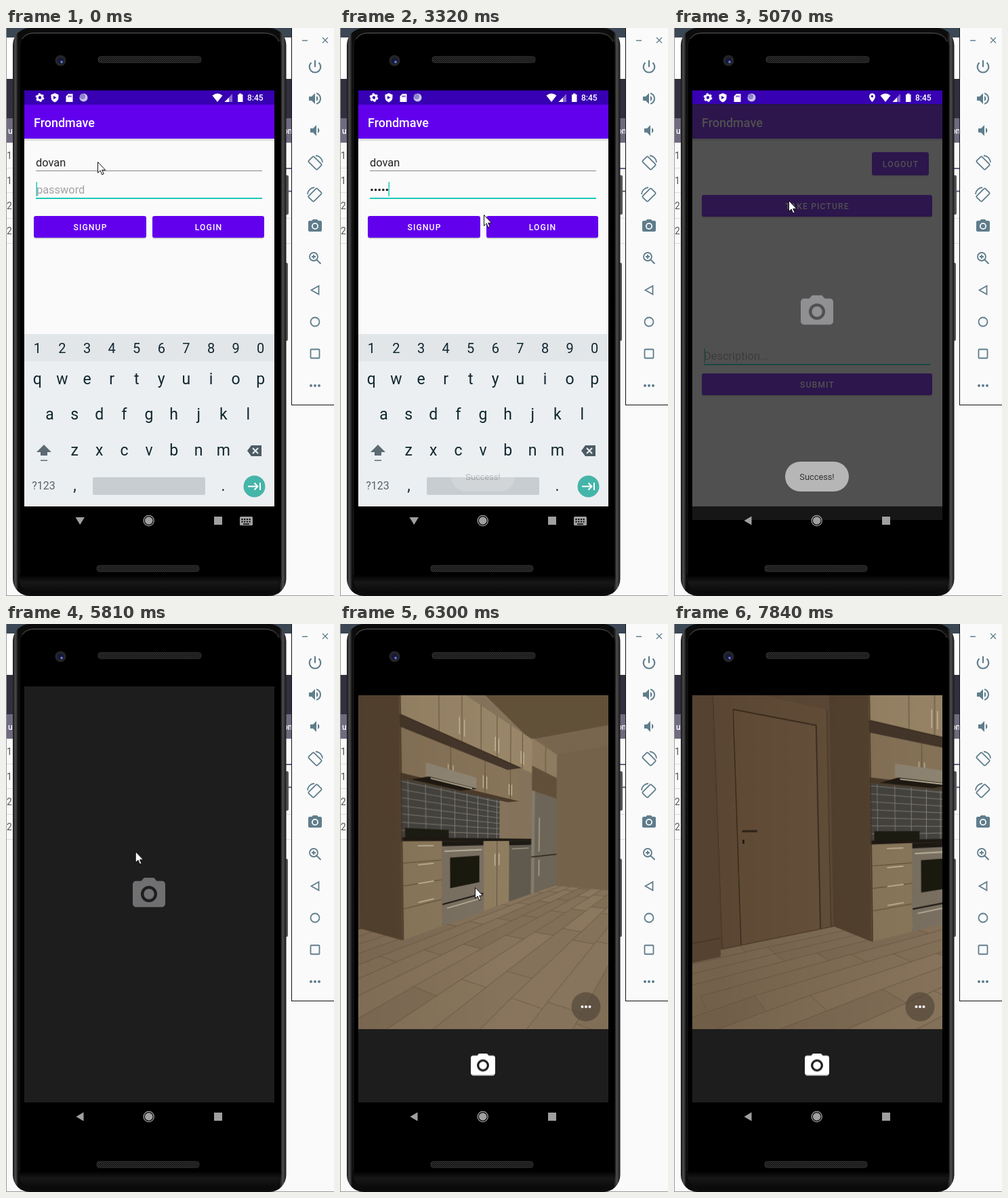
An HTML page with a canvas for the animation above (7.99 s loop, 484 by 837 pixels).

```html
<!DOCTYPE html>
<html lang="en">
<head>
<meta charset="utf-8">
<title>Phone emulator</title>
<style>
html, body { margin: 0; width: 100%; height: 100%; overflow: hidden; background: #fafafa; }
#stage { position: absolute; left: 0; top: 0; width: 484px; height: 837px; overflow: hidden; }
svg { position: absolute; left: 0; top: 0; font-family: Roboto, "Noto Sans", sans-serif; }
#view { position: absolute; left: 27px; top: 92px; width: 369px; height: 505px; background: #000; }
#lens { position: absolute; left: 0; top: 13px; width: 369px; height: 492px; overflow: hidden; }
#room { position: absolute; left: -327px; top: -125px; width: 760px; height: 740px; transform-origin: 511px 371px; }
.btn { font-size: 12.2px; font-weight: 500; letter-spacing: 1.1px; fill: #fff; text-anchor: middle; }
.key { font-size: 23px; fill: #10272f; text-anchor: middle; }
.field { font-size: 16.4px; fill: #222; }
.hint { fill: #a3a3a3; }
.tool { fill: #5f7d8c; }
.line { fill: none; stroke: #5f7d8c; stroke-width: 1.8; }
</style>
</head>
<body>
<div id="stage">
<svg width="484" height="837" viewBox="0 0 484 837">
  <defs>
    <clipPath id="screen"><rect x="27" y="92" width="369" height="613"/></clipPath>
    <clipPath id="loginBox"><rect x="216" y="277" width="165" height="32" rx="3"/></clipPath>
    <clipPath id="takeBox"><rect x="41" y="246" width="340" height="32" rx="3"/></clipPath>
    <linearGradient id="chin" x1="0" y1="0" x2="0" y2="1"><stop offset="0"/><stop offset=".4" stop-color="#171717"/><stop offset="1" stop-color="#080808"/></linearGradient>
    <linearGradient id="rim"><stop offset="0" stop-color="#161616"/><stop offset=".01" stop-color="#4c4c4c"/><stop offset=".02" stop-color="#0c0c0c"/><stop offset=".975" stop-color="#0c0c0c"/><stop offset=".988" stop-color="#4c4c4c"/><stop offset="1" stop-color="#161616"/></linearGradient>
    <pattern id="mesh" width="3" height="3" patternUnits="userSpaceOnUse"><rect width="3" height="3" fill="#111"/><path d="M0 0l3 3M3 0l-3 3" stroke="#383838" stroke-width=".7"/></pattern>
    <g id="shutter" transform="translate(-12 -11)"><path fill-rule="evenodd" d="M9 2L7.2 4H4a2 2 0 0 0-2 2v12a2 2 0 0 0 2 2h16a2 2 0 0 0 2-2V6a2 2 0 0 0-2-2h-3.2L15 2zM12 17a5 5 0 1 1 0-10 5 5 0 0 1 0 10z"/><circle cx="12" cy="12" r="3.2"/></g>
  </defs>

  <!-- desktop behind the phone -->
  <rect width="484" height="837" fill="#fafafa"/>
  <rect width="421" height="14" fill="#3b4754"/>
  <rect y="14" width="421" height="61" fill="#fff"/>
  <rect y="75" width="421" height="58" fill="#322f3e"/>
  <rect y="133" width="421" height="36" fill="#706a80"/>
  <path d="M0 206.5H421M0 242.5H421M0 280.5H421M0 317.5H421" stroke="#ddd"/>
  <path d="M412 207h9M412 240.5h9" stroke="#3b3560" stroke-width="1.5"/>
  <g font-size="12" fill="#fff" font-weight="500"><text x="3" y="156">u</text><text x="409" y="156">om</text></g>
  <g font-size="14" fill="#555"><text x="1" y="193">1</text><text x="1" y="230">1</text><text x="1" y="267">2</text><text x="1" y="304">2</text></g>
  <path d="M0 836.5H484M.5 0V837" stroke="#999"/>

  <!-- phone body -->
  <rect x="411" y="217" width="6" height="58" rx="2" fill="#555"/>
  <rect x="411" y="346" width="5" height="115" rx="2" fill="#555"/>
  <rect x="10" y="0" width="403.500" height="837" rx="25" fill="url(#rim)"/>
  <rect x="20" y="7" width="386" height="824" rx="20" stroke="#1c1c1c"/>
  <path d="M24 16Q29 7.500 42 7.500H380Q398 7.500 403 20" fill="none" stroke="#555"/>
  <path d="M19 806H406Q404 833 382 833H42Q22 833 19 806" fill="url(#chin)"/>
  <rect x="136" y="42" width="152" height="9" rx="4" fill="url(#mesh)" stroke="#333"/>
  <rect x="134" y="792" width="151" height="9" rx="4" fill="url(#mesh)" stroke="#333"/>
  <circle cx="80.500" cy="48" r="8" fill="#252528"/><circle cx="80.500" cy="48" r="4.500" fill="#151a38"/><circle cx="82" cy="50" r="1.800" fill="#6b7ff0"/>

  <g clip-path="url(#screen)">
    <rect x="27" y="92" width="369" height="613" fill="#fafafa"/>
    <g id="login">
      <text class="field" x="44" y="204">dovan</text>
      <path d="M44 210.500H378" stroke="#888"/>
      <text id="hint" class="field hint" x="45" y="244">password</text>
      <g id="dots"></g>
      <text id="letter" class="field" x="44" y="244">e</text>
      <path d="M44 251H378" stroke="#1ec9b7" stroke-width="1.800"/>
      <rect id="caret" x="44.500" y="227" width="1.500" height="21" fill="#1ec9b7"/>
      <g id="entry"></g>
      <g clip-path="url(#loginBox)"><circle id="rippleA" cx="287" cy="293" r="1" fill="#fff"/></g>
      <g id="kb"></g>
    </g>
    <g id="main">
      <rect x="27" y="163" width="369" height="542" fill="#fefefe"/>
      <g id="post"></g>
      <g clip-path="url(#takeBox)"><circle id="rippleB" cx="169" cy="255" r="1" fill="#fff"/></g>
      <text class="field hint" x="44" y="489">Description...</text>
      <path d="M44 496H378" stroke="#1ed8d0" stroke-width="1.800"/>
      <rect x="44.500" y="472" width="1.300" height="22" fill="#1ec9b7"/>
    </g>
    <rect x="27" y="163" width="369" height="3" opacity=".12"/>
    <rect x="27" y="113" width="369" height="50" fill="#6200ee"/>
    <text x="41" y="145.500" font-size="18" font-weight="500" fill="#fff">Frondmave</text>
    <rect x="27" y="92" width="369" height="21" fill="#3700b3"/>
    <g fill="#fff">
      <circle cx="50" cy="102.500" r="3.700" fill="none" stroke="#fff" stroke-width="3"/>
      <circle cx="50" cy="102.500" r="5.400" fill="none" stroke="#fff" stroke-width="2" stroke-dasharray="2.800 2.850"/>
      <path fill-rule="evenodd" d="M72 96l5.500 2.300v4q0 5-5.500 7.200-5.500-2.200-5.500-7.200v-4zM70 100v5l4.500-2.500z"/>
      <path fill-rule="evenodd" d="M92 97h6.500v12h-10v-8.500zM91.500 99.500v2.500h1v-2.500zM93.500 99.500v2.500h1v-2.500zM95.500 99.500v2.500h1v-2.500z"/>
      <circle cx="114.500" cy="102.500" r="6" fill="#c9c4ea"/><circle cx="113" cy="101" r="4" fill="#8f82cf"/>
      <path id="pin" fill-rule="evenodd" d="M292.500 109q-4.500-5-4.500-8.200a4.500 4.500 0 0 1 9 0q0 3.200-4.500 8.200zM292.500 99a1.700 1.700 0 1 0 .01 0z"/>
      <path d="M304.500 99.500q7.500-6 15 0L312 109z"/>
      <path d="M334 97v12H322.500z" opacity=".4"/><path d="M329 102.500V109h-6.500z"/>
      <path d="M342 98h2v-1.500h3.500V98h2v11H342z"/>
      <text x="356" y="107" font-size="12" font-weight="500">8:45</text>
    </g>
  </g>

  <g id="cam">
    <rect x="27" y="92" width="369" height="613" fill="#1d1d1d"/>
    <use id="bigShot" href="#shutter" fill="#707073" transform="translate(211 395.500) scale(2.400)"/>
    <use id="smallShot" href="#shutter" fill="#fff" transform="translate(211 648.700) scale(1.800)"/>
  </g>

  <g fill="#a0a0a0">
    <g id="navKb"><path d="M102.500 721h13.500l-6.750 11z"/><rect x="345" y="720" width="19" height="13" rx="1.500"/><path d="M347.500 724H362M347.500 727.500H362" stroke="#000" stroke-width="2" stroke-dasharray="2 1.700"/><path d="M350 731h9" stroke="#000" stroke-width="1.500"/></g>
    <path id="navBack" d="M114.500 719.500v13l-11-6.500z"/>
    <circle cx="210.700" cy="726" r="5.800"/><circle cx="210.700" cy="726" r="7.600" fill="none" stroke="#a0a0a0" stroke-width="1.300"/>
    <rect x="307" y="720" width="12" height="12"/>
  </g>
  <g id="toast"><rect x="164" y="639" width="94" height="44" rx="22" fill="#efefef"/><text x="211" y="666" font-size="12.800" fill="#222" text-anchor="middle">Success!</text></g>

  <!-- emulator toolbar -->
  <rect x="421.500" y="-2" width="70" height="557.500" fill="#fafafa" stroke="#111"/>
  <path class="line" style="stroke-width:1.300" d="M437 18.500h8M467 14l8 8M475 14l-8 8"/>
  <path class="line" d="M456 47.500v10M450.500 51a8.300 8.300 0 1 0 11 0" style="stroke-width:2.200"/>
  <path class="tool" transform="translate(444 92)" d="M3 9v6h4l5 5V4L7 9zM16.500 12q0-2.700-2.500-4v8q2.500-1.300 2.500-4zM14 3.200v2.100q5 1.700 5 6.700t-5 6.700v2.100q7-2 7-8.800t-7-8.800z"/>
  <path class="tool" transform="translate(444 139)" d="M18.500 12q0-2.700-2.500-4v8q2.500-1.300 2.500-4zM5 9v6h4l5 5V4L9 9z"/>
  <g id="turn"><rect class="line" x="-5.500" y="-9" width="11" height="18" rx="1.500" transform="translate(456 199) rotate(-45)"/><path class="line" d="M457 188a10.500 10.500 0 0 1 10 10"/></g>
  <use href="#turn" transform="translate(912 47) scale(-1 1)"/>
  <use href="#shutter" class="tool" transform="translate(456 291)"/>
  <path class="line" d="M460 337a6 6 0 1 0-12 0 6 6 0 0 0 12 0zM458.500 341.500l6 6M451 337h6M454 334v6"/>
  <path class="line" d="M461.500 380v12.500l-11-6.250z"/>
  <circle class="line" cx="456" cy="433" r="6.500"/>
  <rect class="line" x="449.500" y="473.500" width="13" height="13" rx="1"/>
  <path d="M450 527h12.100" fill="none" stroke="#5f7d8c" stroke-width="4" stroke-linecap="round" stroke-dasharray="0 6"/>
</svg>

<div id="view"><div id="lens"><canvas id="room" width="1520" height="1480"></canvas></div></div>

<svg width="484" height="837" viewBox="0 0 484 837">
  <g id="more"><circle cx="363" cy="564" r="21.500" fill="#4b4034" opacity=".6"/><path d="M357.500 564h11.100" stroke="#fff" stroke-width="4" stroke-linecap="round" stroke-dasharray="0 5.500"/></g>
  <path id="mouse" d="M.5.500V16.500l3.700-3.500 2.500 6 2.500-1-2.500-5.700h5z" fill="#fff" stroke="#111"/>
</svg>
</div>

<script>
const $ = id => document.getElementById(id);
const LOOP = 7990, TICK = 120;

// ---- static interface parts ----
const button = (x, y, w, h, label) =>
  `<rect x="${x}" y="${y + 1.5}" width="${w}" height="${h}" rx="3" opacity=".22"/>
   <rect x="${x}" y="${y}" width="${w}" height="${h}" rx="3" fill="#6200ee"/>
   <text class="btn" x="${x + w / 2 + .5}" y="${y + h / 2 + 4.5}">${label}</text>`;
$('entry').innerHTML = button(41, 277, 166, 32, 'SIGNUP') + button(216, 277, 165, 32, 'LOGIN');
$('post').innerHTML = button(292, 183, 84, 34, 'LOGOUT') + button(41, 246, 340, 32, 'TAKE PICTURE') + button(41, 509, 340, 32, 'SUBMIT');

const row = (keys, y, size = 23) => [...keys].map((k, i) =>
  `<text class="key" style="font-size:${size}px" x="${211 + (i - (keys.length - 1) / 2) * 36.6}" y="${y}">${k}</text>`).join('');
$('kb').innerHTML = `<rect x="27" y="451" width="369" height="254" fill="#eceff1"/>
  <rect x="27" y="451" width="369" height="40" fill="#e2e6e9"/>` +
  row('1234567890', 479, 20) + row('qwertyuiop', 525) + row('asdfghjkl', 577) + row('zxcvbnm', 630) +
  `<path d="M56 614l11 11h-6v5h-10v-5h-6zM51 636.5h10v1.5h-10z" fill="#5c6a72"/>
  <path d="M362 615h15v16h-15l-6-8z" fill="#4d5b64"/><path d="M364 619l8 8M372 619l-8 8" stroke="#eceff1" stroke-width="2"/>
  <text class="key" style="font-size:16px;fill:#56646c" x="55.5" y="680">?123</text>
  <text class="key" x="101.5" y="682">,</text><text class="key" x="320.5" y="682">.</text>
  <rect x="128" y="662" width="166" height="26" rx="2" fill="#c8cdd1"/>
  <circle cx="366.5" cy="675.5" r="16" fill="#45b5a9"/>
  <path d="M357 675.5h14M366.5 670.5l5 5-5 5M375 670v11" fill="none" stroke="#fff" stroke-width="2"/>`;

// ---- the virtual room: drawn once in perspective, then turned by CSS ----
// u runs along the kitchen wall, v out from it, h up from the floor
const F = 430, CX = 211, HORIZON = 319, TURN = 24.9;
const ctx = $('room').getContext('2d');
ctx.setTransform(2, 0, 0, 2, 600, 40);
ctx.lineJoin = 'round';

const depth = (u, v) => 2.93 + .821 * u - .571 * v;
const project = ([u, v, h]) => {
  const k = F / depth(u, v), y = HORIZON + (1 - h) * k;
  return [CX + (-.743 + .571 * u + .821 * v) * k * (1 + (466 - y) * .00012), y];
};
const trace = pts => { ctx.beginPath(); pts.forEach(p => ctx.lineTo(...p)); };
const fill = (color, ...pts) => { trace(pts); ctx.closePath(); ctx.fillStyle = color; ctx.fill(); };
const line = (color, w, ...pts) => { trace(pts.map(project)); ctx.strokeStyle = color; ctx.lineWidth = w; ctx.stroke(); };
const face = (color, ...pts) => fill(color, ...pts.map(project));
const front = (color, u0, u1, h0, h1, v = 0) => face(color, [u0, v, h0], [u1, v, h0], [u1, v, h1], [u0, v, h1]);
const side = (color, u, v0, v1, h0, h1) => face(color, [u, v0, h0], [u, v1, h0], [u, v1, h1], [u, v0, h1]);
const level = (color, u0, u1, v0, v1, h) => face(color, [u0, v0, h], [u1, v0, h], [u1, v1, h], [u0, v1, h]);
const post = (color, w, u, h0, h1, v = 0) => line(color, w, [u, v, h0], [u, v, h1]);
const rail = (color, w, u0, u1, h, v = 0) => line(color, w, [u0, v, h], [u1, v, h]);

const SEAM = '#65543e', STEEL = '#c9bda3', DARK = '#1d1913';
let seed = 7;
const rnd = () => (seed = seed * 16807 % 2147483647) / 2147483647;

function drawFloor() {
  const w = .21, len = 1.3;
  ctx.fillStyle = '#85735b';
  ctx.fillRect(-300, -20, 760, 740);
  for (let v = -3; v < 4.4; v += w) {
    for (let u = -5 - rnd() * len; u < 8; u += len) {
      const color = `hsl(33 19% ${42 + rnd() * 4}%)`;
      if (depth(u, v + w) < .3) continue;
      level(color, u, u + len, v, v + w, 0);
      line('#6b5a45', .8, [u + len, v, 0], [u, v, 0], [u, v + w, 0]);
    }
  }
}

function drawDoor() {
  const v = -.7, wood = '#604c39';
  front(wood, -1.6, .1, 0, 3.6, v);
  front('#67523d', -1.34, -.04, 0, 2.66, v);
  front('#6b553f', -1.15, -.19, 0, 2.44, v);
  line('#3b2d1f', 2.2, [-1.15, v, 0], [-1.15, v, 2.44], [-.19, v, 2.44], [-.19, v, 0]);
  [-1.34, -.04].forEach(u => post('#4b3a2a', 1.5, u, 0, 2.66, v));
  rail('#4b3a2a', 1.2, -1.34, .1, 0, v);
  rail('#33271c', 4, -1.1, -.94, 1.17, v);
  post('#21180f', 4, -1.09, 1.04, 1.08, v);
  front('#624d3a', -2.2, -1.4, 0, 3.4, -.5);
  rail('#4b3a2a', 1.5, -2.2, -1.4, .17, -.5);
}

function drawKitchen() {
  // far wall, ceiling and beam
  fill('#74624b', [285, 140], [460, 140], [460, 398], [327, 386], [290, 398]);
  fill('#625139', [95, -20], [460, -20], [460, 137], [290, 170]);
  fill('#78664e', [290, 170], [460, 137], [460, 168], [326, 192]);

  // tiled wall
  front('#454440', 0, 2.75, 1, 1.75, -.5);
  for (let h = 1.02; h < 1.75; h += .1) rail('#8b877c', .8, 0, 2.75, h, -.5);
  for (let u = .25; u < 2.75; u += .3) post('#8b877c', .8, u, 1, 1.75, -.5);
  side('#84725a', 3.06, -.5, 0, 0, 2.9);

  // wall cabinets
  level('#4a3b2b', 0, 3.05, -.5, -.25, 1.75);
  front('#877459', 0, 3.05, 1.75, 2.3, -.25);
  for (let u = 1.06; u < 3; u += .82) {
    post(SEAM, 1, u, 1.75, 2.3, -.25);
    [-.05, .05].forEach(d => post(STEEL, 1.2, u + d, 1.82, 2.02, -.25));
  }
  level('#44362a', 0, 2.6, -.25, 0, 2.26);
  front('#998668', 0, 3.06, 2.26, 2.89);
  for (let i = 0; i < 6; i++) {
    const u = .56 + .42 * i;
    post(SEAM, 1, u, 2.26, 2.89);
    if (i % 2) [-.05, .05].forEach(d => post(STEEL, 1.2, u + d, 2.34, 2.56));
  }
  rail('#3b2e20', 1.5, 0, 2.6, 2.26);

  // hood, hob and worktop
  front('#8f8674', .6, 1.65, 1.78, 1.95, -.25);
  level(DARK, .6, 1.6, -.5, -.2, 1.77);
  rail('#e0d5b8', 1.5, .65, 1.5, 1.76, -.22);
  front('#1b1c13', .45, 1.25, 1, 1.15, -.45);
  front(DARK, 0, 3.06, .99, 1.03);

  // base units
  front('#8c7a5e', 0, .59, 0, .99);
  for (let i = 0; i < 4; i++) {
    if (i) rail(SEAM, 1.2, .02, .59, 1 - i * .23);
    rail(STEEL, 1.5, .22, .46, .94 - i * .2);
  }
  front('#7b7264', .6, 1.46, 0, .99);
  front(DARK, .6, 1.46, .93, .99);
  rail('#bdb39d', 2, .64, 1.42, .87);
  front('#19190e', .74, 1.36, .42, .79);
  rail(DARK, 2, .6, 1.46, .25);
  rail('#bdb39d', 1.6, .68, 1.4, .19);
  front('#8f7d60', 1.47, 2.2, 0, .99);
  post(SEAM, 1, 1.83, 0, .99);
  [1.77, 1.89].forEach(u => post(STEEL, 1.2, u, .62, .8));
  front('#605a4e', 2.21, 3.05, 0, .99);
  front(DARK, 2.21, 3.05, .92, .99);
  rail('#9d9482', 1.5, 2.3, 2.95, .86);

  // fridge
  front('#624f3a', 3.06, 4.35, 1.9, 2.4);
  front('#8f7c60', 3.06, 4.35, 2.4, 2.92);
  post(SEAM, 1, 3.7, 2.4, 2.92);
  front('#6c6558', 3.06, 4.4, 0, 1.94);
  front('#837b6c', 3.06, 3.2, 0, 1.94);
  rail('#29231a', 1.5, 3.06, 4.4, .69);
  post('#aaa08d', 1.6, 3.42, .78, 1.45);
  post('#aaa08d', 1.6, 3.42, .3, .62);

  side('#554331', 0, -.7, 0, 0, 3.4);
  post('#463626', 1.5, .01, 0, 2.89);
}

drawFloor();
drawDoor();
drawKitchen();
const dim = ctx.createLinearGradient(-200, 0, 250, 0);
dim.addColorStop(0, 'rgba(40,22,8,.2)');
dim.addColorStop(1, 'rgba(40,22,8,0)');
ctx.fillStyle = dim;
ctx.fillRect(-300, -20, 760, 740);

// ---- timing: each change starts at t and reaches its value in n ticks ----
const css = [], lists = {};
function play(id, prop, start, ...changes) {
  const name = `${id}-${prop}`;
  let value = start, frames = `0%{${prop}:${start}}`;
  const key = (t, ease) => frames += `${(t / LOOP * 100).toFixed(4)}%{${prop}:${value};animation-timing-function:${ease}}`;
  for (const [t, n, next] of changes) {
    key(t, `steps(${n},jump-start)`);
    value = next;
    key(t + n * TICK, 'step-end');
  }
  css.push(`@keyframes ${name}{${frames}}`);
  (lists[id] ||= []).push(`${name} ${LOOP}ms step-end infinite`);
}
const fade = (id, start, ...changes) => play(id, 'opacity', start, ...changes);
const at = (x, y = 0) => `translate(${x}px,${y}px)`;
const show = (id, t) => fade(id, 0, [t, 1, 1]);
const hide = (id, t) => fade(id, 1, [t, 1, 0]);

play('mouse', 'transform', at(135, 197), [1580, 3, at(245, 335)], [1960, 1, at(275, 310)], [2110, 2, at(287, 290)],
  [3200, 2, at(212, 275)], [3440, 4, at(172, 229)], [3970, 1, at(169, 254)], [5570, 4, at(198, 362)], [6180, 2, at(199, 388)]);
hide('mouse', 6800);

// password typing: the newest letter shows until the next one masks it
const masked = [370, 620, 740, 1020, 2510], STEP = 5.6;
$('dots').innerHTML = masked.map((t, i) => `<circle id="dot${i}" cx="${47 + i * STEP}" cy="238.5" r="1.8" fill="#222"/>`).join('');
masked.forEach((t, i) => show('dot' + i, t));
hide('hint', 250);
fade('letter', 0, [250, 1, 1], [2510, 1, 0]);
const typed = masked.slice(0, 4);
play('letter', 'transform', at(0), ...typed.map((t, i) => [t, 1, at((i + 1) * STEP)]));
play('caret', 'transform', at(0), [250, 1, at(9.5)], ...typed.map((t, i) => [t, 1, at(9.5 + (i + 1) * STEP)]), [2510, 1, at(27)]);
fade('caret', 1, [1580, 1, 0], [2110, 1, 1], [2630, 1, 0], [3200, 1, 1]);

function ripple(id, t, r) {
  play(id, 'r', '1px', [t, 3, r + 'px']);
  fade(id, 0, [t, 2, .2], [t + 3 * TICK, 2, 0]);
}
ripple('rippleA', 2390, 120);
ripple('rippleB', 4470, 240);

fade('toast', 0, [3200, 2, .25], [3440, 2, 1], [5070, 1, .64], [5570, 2, 0]);
play('kb', 'transform', at(0), [3440, 2, at(0, 260)]);
fade('main', 0, [3440, 3, 1]);
play('main', 'transform', at(0, 40), [3440, 4, at(0)]);
hide('navKb', 3440);
show('navBack', 3440);
show('pin', 4830);

fade('cam', 0, [5070, 1, .774], [5570, 2, 1]);
play('cam', 'transform', at(0, 20), [5570, 3, at(0)]);
hide('bigShot', 6180);
['smallShot', 'view', 'more'].forEach(id => show(id, 6180));
fade('lens', 0, [6180, 2, 1]);

const yaw = a => `translateY(${a / TURN * 4}px) perspective(${F}px) translateZ(${F}px) rotateY(${-a}deg) translateZ(${-F}px)`;
play('room', 'transform', yaw(-1.2), [6940, 3, yaw(0)], [7330, 2, yaw(.15)], [7600, 3, yaw(TURN)]);

for (const id in lists) css.push(`#${id}{animation:${lists[id].join(',')}}`);
document.head.appendChild(document.createElement('style')).textContent = css.join('\n');
</script>
</body>
</html>
```
